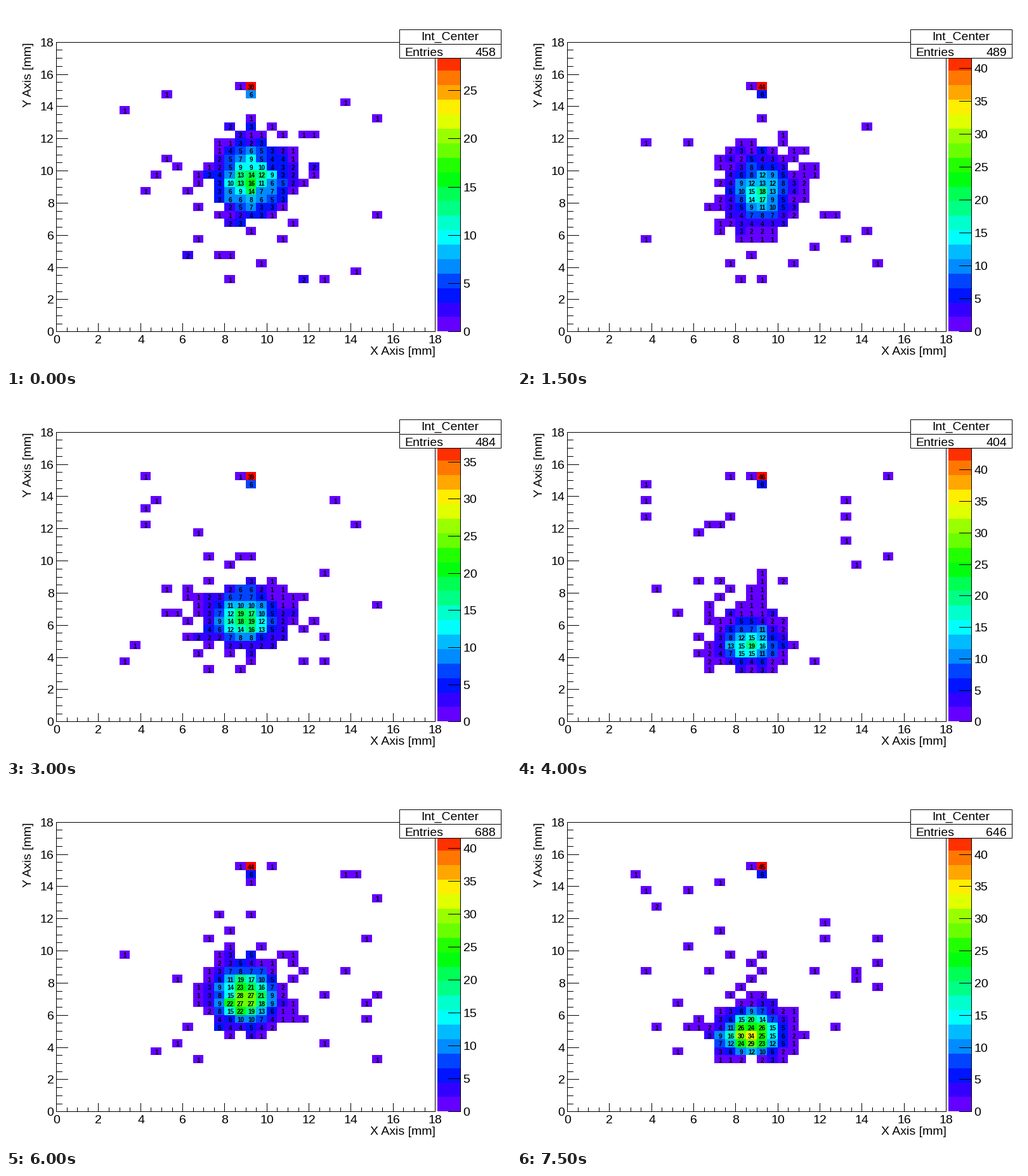
A matplotlib script for the animation above (8 s loop, 796 px wide and 572 px high).

```python
import colorsys

import matplotlib.pyplot as plt
import numpy as np
from matplotlib.animation import FuncAnimation
from matplotlib.colors import ListedColormap
from matplotlib.patches import Rectangle

W, H, DPI = 796, 572, 100
FRAMES, INTERVAL = 16, 500
BINS, SPAN, LEVELS = 36, 18, 20
LEFT, RIGHT, TOP, BOTTOM = 0.1 * W, 0.85 * W, 0.1 * H, 0.9 * H
PX = 72 / DPI  # points per pixel

# Key points of the run: step, total entries, hottest bin
KEY_STEPS = [0, 3, 5, 8, 9, 10, 12, 15]
KEY_ENTRIES = [458, 489, 524, 404, 671, 679, 688, 646]
KEY_HOT = [30, 44, 36, 46, 46, 41, 44, 45]

plt.rcParams["font.family"] = "Liberation Sans"


def at_step(step, values):
    return int(round(np.interp(step, KEY_STEPS, values)))


def px(x):
    return np.floor(LEFT + x * (RIGHT - LEFT) / SPAN)


def py(y):
    return np.floor(BOTTOM - y * (BOTTOM - TOP) / SPAN)


def histogram(step, entries, hot):
    """Counts per bin, indexed [row, column] from the lower left."""
    rng = np.random.default_rng(100 + step)
    k = max(step - 2, 0) % 7  # the spot sweeps down, then jumps back
    second = step > 8
    cx, cy = 9.25 - 0.09 * k, 9.45 - 0.8 * k
    sx = 0.8 if second else 0.9
    up, down = 1.25 - 0.06 * k, 1.2 - 0.1 * k
    far, halo, trail = (30 if second else 22), 14, 4 + 2 * k

    mid = (np.arange(BINS) + 0.5) * SPAN / BINS
    x, y = np.meshgrid(mid, mid)
    sy = np.where(y > cy, up, down)
    core = np.exp(-((x - cx) / sx) ** 2 / 2 - ((y - cy) / sy) ** 2 / 2)
    core[y < 3] = 0
    core *= (entries - hot - 7 - far - halo - trail) / core.sum()
    rough = np.rint(core + 0.4 * np.sqrt(core) * rng.normal(size=core.shape))
    n = np.where(core < 1.5, rng.poisson(core), rough).astype(int)
    n = np.clip(n, 0, hot - 1)

    def scatter(xs, ys):
        ok = (xs > 3) & (xs < 15.5) & (ys > 3) & (ys < 15.5)
        bins = (ys[ok] * 2).astype(int), (xs[ok] * 2).astype(int)
        np.add.at(n, bins, 1)

    scatter(rng.uniform(3, 15.5, far), rng.uniform(3, 15.5, far))
    scatter(rng.normal(cx, 1.7, halo), rng.normal(cy, 1.5, halo))
    scatter(rng.normal(9.15, 0.6, trail),
            cy + rng.triangular(1, 1.5, 5.5, trail))

    # Fixed hot corner
    n[30, 17:19] = 1, hot
    n[29, 17:19] = 0, 6
    return n


def level_color(i):
    hue = 280 - (int((i + 0.99) * 2.5) + 1) * 5.6
    return colorsys.hsv_to_rgb(max(hue, 0) / 360, 1, 1)


fig = plt.figure(figsize=(W / DPI, H / DPI), dpi=DPI, facecolor="white")
ax = fig.add_axes([0, 0, 1, 1])
ax.set_xlim(0, W)
ax.set_ylim(H, 0)
ax.axis("off")


def line(x0, y0, x1, y1, z=3):
    """One-pixel line through whole pixels, both ends included."""
    return ax.plot([x0 + 0.5, x1 + 0.5], [y0 + 0.5, y1 + 0.5], color="black",
                   lw=PX, zorder=z, snap=False,
                   solid_capstyle="projecting")[0]


def box(x0, y0, x1, y1, z, fill="none"):
    ax.add_patch(Rectangle((x0 + 0.5, y0 + 0.5), x1 - x0, y1 - y0, fc=fill,
                           ec="black", lw=PX, zorder=z, snap=False))


def text(x, y, s, size=19.5, ha="center", z=4, **kw):
    return ax.text(x, y, s, fontsize=size * PX, ha=ha, va="baseline",
                   zorder=z, **kw)


cmap = ListedColormap([level_color(i) for i in range(LEVELS)])
edges = np.linspace(0, SPAN, BINS + 1)
style = dict(cmap=cmap, vmin=0, vmax=LEVELS, antialiased=False, zorder=1)
cells = ax.pcolormesh(px(edges), py(edges),
                      np.ma.masked_all((BINS, BINS)), **style)

# Colour scale
ax.pcolormesh([680, 716], py(np.linspace(0, SPAN, LEVELS + 1)),
              np.arange(LEVELS)[:, None] + 0.5, **style)
line(716, py(SPAN), 716, py(0))

# Axes
x0, y0 = px(0), py(0)
box(x0, py(SPAN), px(SPAN), y0, 3)
for k in range(BINS + 1):
    v, major = k / 2, k % 4 == 0
    line(px(v), y0, px(v), y0 - (13 if major else 6))
    line(x0, py(v), x0 + (18 if major else 9), py(v))
    if major:
        text(px(v) + 0.5, 533, f"{v:.0f}")
        text(75.5, py(v) + 7, f"{v:.0f}", ha="right")
text(677, 551, "X Axis [mm]", ha="right")
text(40.5, 57, "Y Axis [mm]", ha="right", rotation=90, rotation_mode="anchor")

# Statistics box
box(620, 37, 780, 82, 6, "white")
line(620, 60, 780, 60, 7)
text(700, 54, "Int_Center", z=7)
text(628, 79, "Entries", ha="left", z=7)
total = text(772, 79, "", ha="right", z=7)

shown = []


def update(step):
    while shown:
        shown.pop().remove()
    entries, hot = at_step(step, KEY_ENTRIES), at_step(step, KEY_HOT)
    n = histogram(step, entries, hot)
    level = np.minimum(n * LEVELS // hot, LEVELS - 1) + 0.5
    cells.set_array(np.ma.masked_where(n == 0, level))
    total.set_text(str(entries))

    for row, col in np.argwhere(n):
        shown.append(text(px(col / 2 + 0.25) + 0.5, py(row / 2 + 0.25) + 5,
                          str(n[row, col]), 10, weight="bold"))
    for v in range(0, hot + 1, 5):
        y = py(v * SPAN / hot)
        shown.append(line(697, y, 716, y))
        shown.append(text(720.5, y + 7, str(v), ha="left"))
    return shown


anim = FuncAnimation(fig, update, frames=FRAMES, interval=INTERVAL,
                     repeat=True, repeat_delay=0, blit=False)
plt.show()
```
